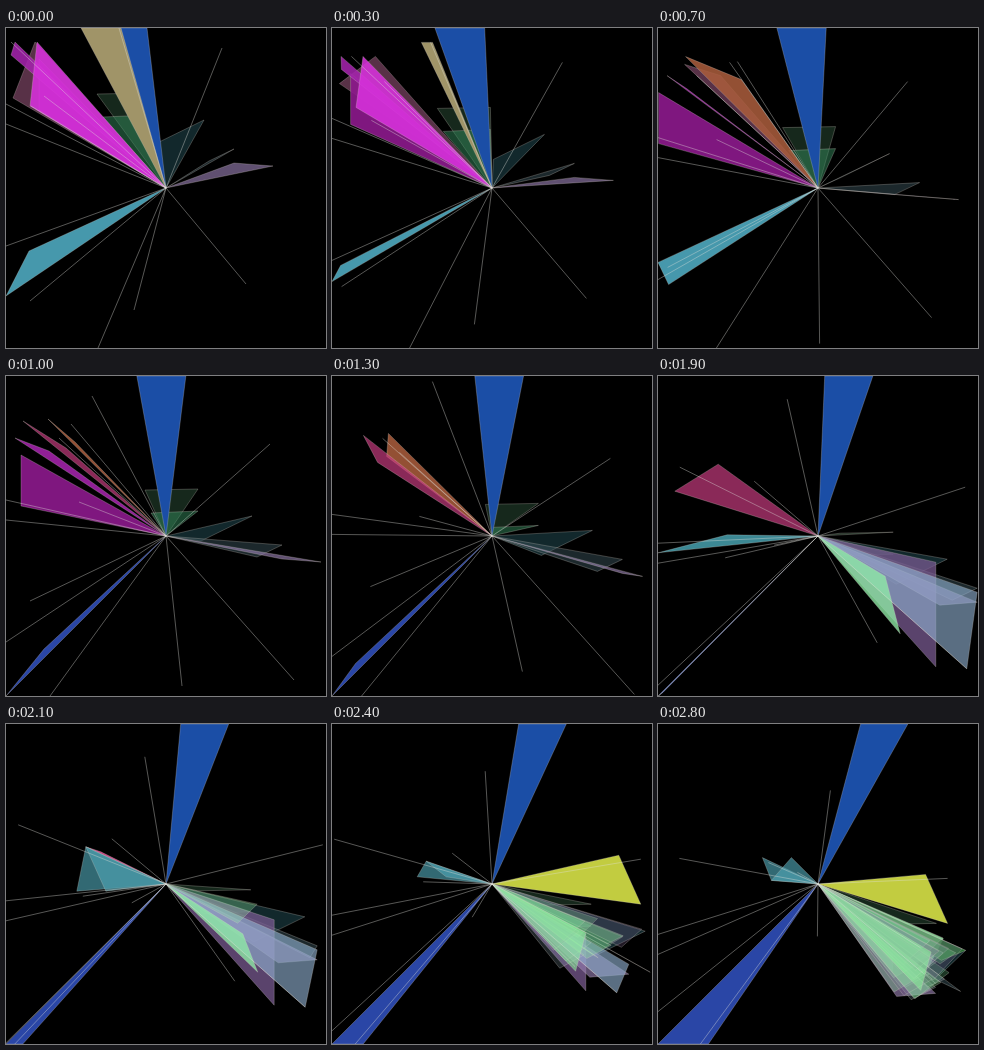
Recreate the animation shown at these times as an HTML page with a canvas. Size 320 by 320 pixels, loop 2.9 s.

```html
<!DOCTYPE html>
<html lang="en">
<head>
<meta charset="utf-8">
<title>Spinning shards</title>
<style>
html, body { margin: 0; width: 100%; height: 100%; overflow: hidden; background: #000; }
canvas { display: block; width: 320px; height: 320px; }
</style>
</head>
<body>
<canvas id="stage" width="320" height="320"></canvas>
<script>
const ctx = document.getElementById("stage").getContext("2d");
const SIZE = 320, C = SIZE / 2, LOOP = 2900, STEP = 100, SPEED = 0.048;
const shards = [];

// Tips drift in a compass direction and bounce off the walls.
// Starts are unfolded, so they may lie outside the stage.
const fold = v => {
  const m = ((v % (2 * SIZE)) + 2 * SIZE) % (2 * SIZE);
  return m > SIZE ? 2 * SIZE - m : m;
};
const sign = (dir, plus, minus) => dir.includes(plus) - dir.includes(minus);
const tip = (x, y, dir, pace = 1) => t => {
  const d = SPEED * pace * t;
  return [fold(x + d * sign(dir, "E", "W")), fold(y + d * sign(dir, "S", "N"))];
};
const wedge = (fill, from, to, ...tips) => shards.push({ fill, from, to, tips });
const ray = (...args) => shards.push({ from: 0, to: LOOP, tips: [tip(...args)] });

// Tips shared by several shards
const crown = tip(-6, -5, "SE");
const leafTop = tip(144, 65, "SE");
const finTop = tip(198, 92, "SE");
const corner = tip(0, 320, "");
const rim = tip(0, 268, "N");
const brow = tip(-21, 22, "SE");
const heel = tip(240, 256, "SE");

// Lower left
wedge("#4698ac", 0, 900, tip(23, 223, "SW"), rim);
wedge("#3c8894", 1400, 1900, tip(-22, 250, "NE"), rim);
wedge("#2a46a6", 1000, 1900, tip(86, 225, "SW"), corner);
wedge("#2a46a6", 2000, LOOP, tip(-84, 320, "E"), corner);

// Greens, then blue and tan over them
wedge("#2c503880", 0, LOOP, tip(91, 66, "SE"), leafTop);
wedge("#348a5c80", 0, LOOP, tip(97, 89, "SE"), tip(144, 87, "SE"));
wedge("#24505880", 0, LOOP, tip(147, 117, "SE"), finTop);
wedge("#1b4ea6", 0, LOOP, tip(91, 0, "E", 0.83), tip(141, 0, "E", 0.81));
wedge("#a09468", 0, 500, tip(75, 0, "SE"), tip(115, 0, "SW"));

// Upper left
wedge("#804868b0", 0, 900, tip(7, 70, "NW"), tip(29, 14, "SE"));
wedge("#a85c3ce0", 400, 1800, crown, tip(117, 18, "SW"));
wedge("#c83c80b0", 1000, 1900, tip(-31, -3, "SE"), tip(108, 24, "SW"));
wedge("#8c1a8ce8", 0, 1000, tip(33, 31, "SW"), tip(33, 82, "SW"));
wedge("#a424ace0", 0, 1000, tip(5, 27, "SW"), tip(9, 14, "S"));
wedge("#d832dce0", 0, 500, tip(31, 14, "S"), tip(24, 78, "S", 0.1));
wedge("#c83c80", 2000, 2300, tip(-6, 27, "SE"), brow);
wedge("#50a8b8a0", 2000, LOOP, brow, tip(-30, 268, "NE"));
wedge("#50a8b8a0", 2000, LOOP, brow, tip(-1, 268, "NE"));

// Right
wedge("#38505880", 0, LOOP, tip(203, 133, "SE"), tip(228, 121, "SE"));
wedge("#785a90c0", 1900, LOOP, tip(369, 382, "NW"), tip(369, 95, "SW"));
wedge("#9a80b4a0", 0, LOOP, tip(228, 135, "SE"), tip(267, 138, "SE"));
wedge("#90b0d0a0", 1800, LOOP, tip(228, 125, "SE"), heel);
wedge("#90eca8c8", 1900, LOOP, tip(136, 109, "SE"), tip(151, 349, "NE"));
wedge("#2c8030c0", 2500, LOOP, finTop, tip(149, 102, "SE"));
wedge("#c2cc40", 2400, LOOP, tip(238, 16, "SE"), tip(216, 65, "SE"));

// Fan gathering at the lower right, one blade after another
let seed = 11;
const rand = () => (seed = seed * 16807 % 2147483647) / 2147483647;
const tints = ["#90f4a048", "#88a0b03c", "#70d89040", "#8468983c"];
const bladeTip = (deg, r, dir) => {
  const a = deg * Math.PI / 180, d = SPEED * 2800;
  return tip(C + r * Math.cos(a) - d * sign(dir, "E", "W"),
             C + r * Math.sin(a) - d * sign(dir, "S", "N"), dir);
};
for (let i = 0; i < 20; i++) {
  const mid = 38 + 18 * (rand() - 0.5), half = 3 + 6 * rand(), r = 125 + 35 * rand();
  const dir = rand() < 0.6 ? "SE" : "SW";
  wedge(tints[i % tints.length], 2100 + i * 35, LOOP,
    bladeTip(mid - half, r, dir), bladeTip(mid + half, r - 8, dir));
}
wedge("#8cf49c90", 2400, LOOP, bladeTip(31, 132, "SE"), bladeTip(46, 148, "SE"));

// Thin rays
ray(216, 20, "SE");
ray(240, 256, "SE");
ray(128, 282, "SE");
ray(92, 320, "W");
ray(24, 273, "NW");
ray(0, 218, "S");
ray(0, 76, "S");
ray(0, 96, "S");
ray(25, 78, "SE");
ray(38, 68, "NE");
ray(113, 0, "SW");
ray(5, 14, "SE");

function draw(t) {
  ctx.fillStyle = "#000";
  ctx.fillRect(0, 0, SIZE, SIZE);
  ctx.lineJoin = "bevel";
  ctx.lineWidth = 0.6;
  for (const { fill, from, to, tips } of shards) {
    if (t < from || t > to) continue;
    ctx.beginPath();
    ctx.moveTo(C, C);
    for (const at of tips) ctx.lineTo(...at(t));
    if (fill) {
      ctx.closePath();
      ctx.fillStyle = fill;
      ctx.fill();
    }
    ctx.strokeStyle = fill ? "rgba(215,205,200,.45)" : "rgba(225,225,220,.65)";
    ctx.stroke();
  }
}

function tick() {
  draw(Math.floor(performance.now() % LOOP / STEP) * STEP);
  requestAnimationFrame(tick);
}
tick();
</script>
</body>
</html>
```
